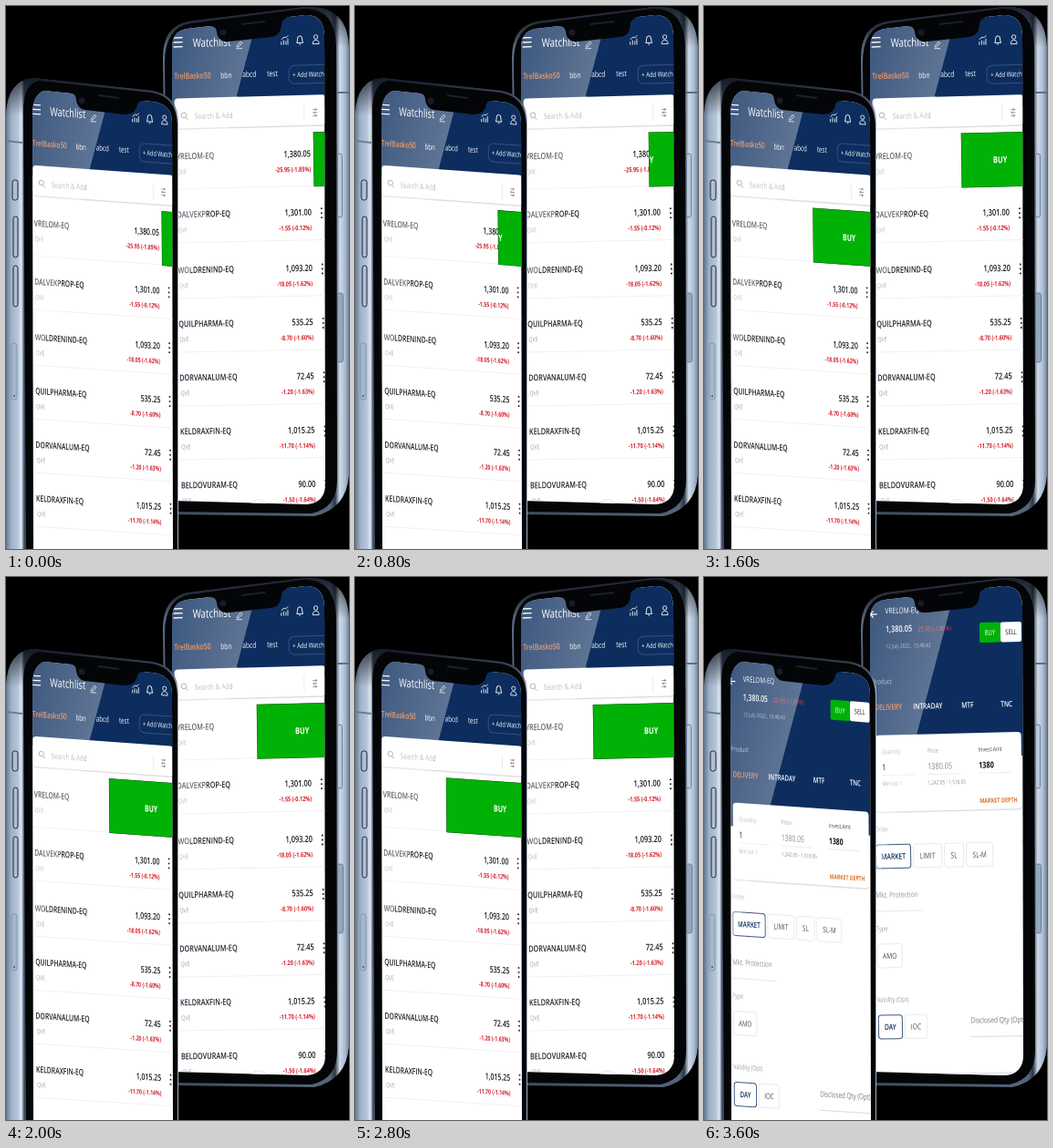
These frames come from a looping animation (376 by 596 pixels, 4000 ms). An HTML page:

```html
<!DOCTYPE html>
<html lang="en">
<head>
<meta charset="utf-8">
<title>Watchlist phones</title>
<style>
html, body { margin: 0; width: 100%; height: 100%; overflow: hidden; background: #000; }
#stage { display: block; width: 376px; height: 596px; }
text { font-family: "Open Sans", "Noto Sans", sans-serif; white-space: pre; }
</style>
</head>
<body>
<svg id="stage" viewBox="0 0 376 596" xmlns="http://www.w3.org/2000/svg"></svg>
<script>
const NAVY = '#0c2d5e', ORANGE = '#e8793a', RED = '#d3222c', GREEN = '#00b205';
const INK = '#1d2026', GREY = '#a3a6ab', BLACK = '#040507';
const STEP = 400, LOOP = 4000, ORDER_STEP = 9;
// left edge of the swipe panel at each step
const SWIPE = [151.5, 144, 136.5, 109.5, 96.5, 89.5, 82.5, 75.5, 68.5];

const ROWS = [
  [165, 'VRELOM-EQ', '1,380.05', '-25.95 (-1.85%)'],
  [229, 'DALVEKPROP-EQ', '1,301.00', '-1.55 (-0.12%)'],
  [290, 'WOLDRENIND-EQ', '1,093.20', '-18.05 (-1.62%)'],
  [349, 'QUILPHARMA-EQ', '535.25', '-8.70 (-1.60%)'],
  [408, 'DORVANALUM-EQ', '72.45', '-1.20 (-1.63%)'],
  [467, 'KELDRAXFIN-EQ', '1,015.25', '-11.70 (-1.14%)'],
  [526, 'BELDOVURAM-EQ', '90.00', '-1.50 (-1.64%)']
];

// Each phone maps screen units (u across, v down) to the stage.
const PHONES = [
  {
    id: 'back', x: 186, dy: 0, k: 1, shear: .015, slope: v => -.03 + .00003 * v,
    shell: 'M172 60Q171 22 200 17L328 1Q374-1 376 45L376 515Q373 552 338 560L180 558Z',
    bezel: 'M174 62Q174 24 202 19L327 3Q361 2 362 45L363 520Q363 551 335 557L180 555Z',
    screen: 'M182 46Q182 28 198 25L328 10Q348 9 349 32L350 525Q350 545 330 547L182 543Z',
    notch: 'M224 22Q230 22 231 28Q232 40 244 39L290 34Q301 33 302 20Q302 15 308 13L308 9L224 19Z',
    camera: [238, 29], speaker: 'M258 20L284 17',
    metal: [[0, '#5d6d83'], [.06, '#3f4c60'], [.9, '#55657c'], [.925, '#2a3546'], [.95, '#cfdbe8'], [.98, '#a8bad0'], [1, '#6d8099']],
    glare: 'M170 0H279L133 550H170Z', edge: [267, 45],
    side: bar(363.5, 162, 5, 70, '#b9c9da') + bar(363.5, 315, 6, 76, '#94a7be') + line('M363 95H376', '#5d6f86', 2)
  },
  {
    id: 'front', x: 30, dy: 73.3, k: .93, shear: .008, slope: v => .068 - .00002 * v,
    shell: 'M0 118Q2 82 30 79L160 93Q189 98 189 128L189 596L0 596Z',
    bezel: 'M19 120Q18 85 36 82L160 95Q187 100 188 130L188 596L22 596Z',
    screen: 'M29 120Q29 97 42 93L160 105Q182 107 182 128L183 596L30 596Z',
    notch: 'M72 96Q77 97 77 103Q78 112 86 114L130 119Q142 119 144 108Q145 104 150 104L150 98L72 90Z',
    camera: [83, 104], speaker: 'M101 98L124 101',
    metal: [[0, '#64768e'], [.03, '#9fb1c7'], [.07, '#b6c6d9'], [.09, '#e0e9f3'], [.105, '#3a4860'], [.97, '#66778e'], [1, '#a9b9cb']],
    glare: 'M20 80H118L-19 596H20Z', edge: [108, 118],
    side: bar(7, 191, 6, 22, '#aebfd3', '#1d2735') + bar(8, 231, 5, 45, '#aebfd3', '#1d2735') +
      bar(8, 285, 5, 45, '#aebfd3', '#1d2735') + bar(6, 370, 6, 62, '#a5b7cc', '#8396ae') +
      `<circle cx="9" cy="428" r="1" fill="#44546a"/>` + line('M0 148L18 150', '#6b7d94', 2)
  }
];

function bar(x, y, w, h, fill, stroke = '#6d8098') {
  return `<rect x="${x}" y="${y}" width="${w}" height="${h}" rx="2.5" fill="${fill}" stroke="${stroke}"/>`;
}

function line(d, color, width = 1) {
  return `<path d="${d}" fill="none" stroke="${color}" stroke-width="${width}"/>`;
}

function label(str, size, fill, weight = 400, anchor = 'start', x = 0, y = 0) {
  return `<text transform="translate(${x} ${y}) scale(.76 1)" y="${size * .36}" font-size="${size}" ` +
    `fill="${fill}" font-weight="${weight}" text-anchor="${anchor}">${str.replace(/&/g, '&amp;')}</text>`;
}

function tools(p) {
  const at = (u, v, inner) => {
    const s = p.slope(v);
    const x = p.x + p.k * u + p.shear * (v - 200), y = v + p.dy + s * u;
    return `<g transform="matrix(${p.k} ${s} ${p.shear} 1 ${x} ${y})">${inner}</g>`;
  };
  const icon = (u, v, inner) => at(u, v, `<g transform="scale(.85)">${inner}</g>`);
  const text = (u, v, ...args) => at(u, v, label(...args));
  const box = (u, v, w, h, fill, stroke = 'none', r = 0) => at(u, v,
    `<rect width="${w}" height="${h}" rx="${r}" fill="${fill}" stroke="${stroke}"/>`);
  const rule = (u, v, w, color = '#e6e8ea') => at(u, v, line(`M0 0H${w}`, color));
  const header = v => at(-12, v, `<rect y="-220" width="190" height="220" fill="${NAVY}"/>`);
  const card = (u, v, w, h) => box(u, v + 1.5, w, h, 'rgba(0,0,0,.13)', 'none', 4) + box(u, v, w, h, '#fff', 'none', 4);
  return { at, icon, text, box, rule, header, card };
}

function listScreen(p) {
  const { at, icon, text, box, rule, header, card } = tools(p);
  let out = header(112);
  out += at(0, 40, line('M0-5H10M0 0H10M0 5H10', '#fff', 1.3));
  out += text(21, 41, 'Watchlist', 13, '#fff');
  out += icon(72, 44.5, line('M-3 2L2-4L4-2L-1 3L-3 3ZM-4 5H4', '#fff', .9));
  out += icon(121.5, 41, line('M-4 6V2M-1 6V0M2 6V1M4.500 6V-2M-4-1L0-4L2-3L5-6', '#fff'));
  out += icon(138.5, 41, line('M-4 4Q-3 2-3-1Q-3-5 0-5Q3-5 3-1Q3 2 4 4ZM-1 6H1', '#fff', 1.1));
  out += icon(156, 41, `<circle cy="-3" r="2.600" fill="none" stroke="#fff"/>` + line('M-4 6Q-4 1 0 1Q4 1 4 6Z', '#fff'));

  out += text(0, 77, 'TrelBasko50', 9.2, ORANGE, 600);
  out += text(51, 77.5, 'bbn', 8.8, '#fff') + text(75, 77, 'abcd', 8.8, '#fff') + text(102, 77, 'test', 8.8, '#fff');
  out += box(126, 69, 60, 20, 'none', '#36527c', 6) + text(130, 79, '+ Add Watch', 7.8, '#fff');

  out += card(0, 101.5, 166, 33);
  out += icon(11, 121, `<circle cx="-1" cy="-1" r="3.300" fill="none" stroke="#888"/>` + line('M1.500 2L4 5', '#888'));
  out += text(22, 121.5, 'Search & Add', 8.8, '#a2a4a8');
  out += at(142, 121, line('M0-9V9', '#ececec'));
  out += icon(154, 121, line('M-3-4H3M-3 0H3M-3 4H3', '#888') + line('M1-5.500V-2.500M-1-1.500V1.500M1 2.500V5.500', '#888', 1.2));

  ROWS.forEach(([v, name, price, change], i) => {
    out += text(1, v, name, 9.6, INK, 600);
    out += text(2, v + 17, 'QVE', 7, '#a0a0a0');
    out += text(148.5, v + .5, price, 9.8, '#15171b', 600, 'end');
    out += text(148.5, v + 17.5, change, 7.3, RED, 700, 'end');
    out += at(159.5, v + 2, [-5, 0, 5].map(y => `<circle cy="${y}" r="1" fill="#222"/>`).join(''));
    out += rule(0, v + (i ? 31 : 36), 166, '#f0f0f2');
  });
  out += at(86, 553, '<circle r="10" fill="#fff" stroke="#e8e8e8"/>');
  out += at(0, 172, `<svg class="swipe" y="-30" height="60" overflow="hidden">
    <rect width="170" height="60" fill="${GREEN}" stroke="#084a0a"/>
    <g class="buy">${label('BUY', 9.8, '#fff', 700, 'middle', 0, 30)}</g></svg>`);
  return out;
}

function orderScreen(p) {
  const { at, text, box, rule, header, card } = tools(p);
  const button = (u, v, w, str, on) =>
    box(u, v - 13, w, 26, '#fff', on ? '#40587d' : '#e9ebee', 3) +
    text(u + w / 2, v, str, 8.8, on ? NAVY : '#4c5057', on ? 600 : 400, 'middle');
  const field = (u, v, head, value, note, ink, weight, headInk = GREY) =>
    text(u, v, head, 6.8, headInk) +
    text(u, v + 17, value, 9.6, ink, weight) + rule(u, v + 26, 36, '#ececee') +
    text(u, v + 35, note, 6.3, '#8b8e93');

  let out = header(200);
  out += at(-2, 41, line('M8 0H1M4-3.500L.500 0L4 3.500', '#fff', 1.2));
  out += text(15, 37.5, 'VRELOM-EQ', 8.7, '#fff');
  out += text(15, 57.5, '1,380.05', 9.7, '#fff', 600);
  out += text(49, 58.5, '-25.95 (-1.85%)', 7.3, '#dd3d42');
  out += text(15, 76.5, '12 July 2022 , 15:48:43', 6.3, '#a9b4c5');
  out += box(118, 53.5, 23, 22, GREEN, 'none', 2) + box(141, 53.5, 23, 22, '#fff', 'none', 2);
  out += text(129.5, 64.5, 'BUY', 7.8, '#fff', 500, 'middle') + text(152.5, 64.5, 'SELL', 7.8, '#222', 500, 'middle');
  out += text(0, 115, 'Product', 7.6, '#a9b7ca');
  ['DELIVERY', 'INTRADAY', 'MTF', 'TNC'].forEach((str, i) => {
    out += text([2, 44, 97, 140][i], 143, str, 8.7, i ? '#fff' : ORANGE, 600);
  });

  out += card(2, 174, 160, 84);
  out += field(9, 192, 'Quantity', '1', 'Min Lot: 1', '#222', 600);
  out += field(59, 192, 'Price', '1380.05', '1,242.05 - 1,518.05', '#85888d', 400);
  out += field(115, 192, 'Invest.Amt', '1380', '', '#111', 700, '#444');
  out += text(157, 248, 'MARKET DEPTH', 7.2, '#d9732f', 700, 'end');

  out += text(0, 277, 'Order', 7.4, GREY);
  out += button(1, 307, 38, 'MARKET', true) + button(42, 307, 31, 'LIMIT') + button(76, 307, 21, 'SL') + button(100, 307, 29, 'SL-M');
  out += text(0, 349, 'Mkt. Protection', 8.6, '#8f9297') + rule(0, 367, 51);
  out += text(0, 386, 'Type', 7.6, GREY) + button(1, 416, 27, 'AMO');
  out += text(0, 464, 'Validity (Opt)', 7.6, '#9a9da2');
  out += button(1, 494, 26, 'DAY', true) + button(30, 494, 24, 'IOC');
  out += text(102, 488, 'Disclosed Qty (Opt)', 8.8, '#74777c') + rule(102, 506, 64, '#d9dbde');
  out += box(-4, 545, 180, 30, '#ececee');
  return out;
}

function phone(p) {
  const [ex, ey] = p.edge, [cx, cy] = p.camera;
  const stops = p.metal.map(([o, c]) => `<stop offset="${o}" stop-color="${c}"/>`).join('');
  return `<defs>
    <linearGradient id="${p.id}-metal">${stops}</linearGradient>
    <linearGradient id="${p.id}-shade" x2="0" y2="1">
      <stop offset="0" stop-color="#080c14" stop-opacity=".75"/><stop offset=".08" stop-color="#080c14" stop-opacity="0"/>
    </linearGradient>
    <linearGradient id="${p.id}-glare" gradientUnits="userSpaceOnUse" x1="${ex - 85}" y1="${ey - 22}" x2="${ex}" y2="${ey}">
      <stop offset="0" stop-color="#fff" stop-opacity=".2"/><stop offset="1" stop-color="#fff" stop-opacity=".34"/>
    </linearGradient>
    <clipPath id="${p.id}-clip"><path d="${p.screen}"/></clipPath></defs>
    <path d="${p.shell}" fill="url(#${p.id}-metal)"/>
    <path d="${p.shell}" fill="url(#${p.id}-shade)"/>${p.side}
    <path d="${p.bezel}" fill="${BLACK}"/>
    <g clip-path="url(#${p.id}-clip)">
      <rect width="376" height="596" fill="#fff"/>
      <g class="list">${listScreen(p)}</g>
      <g class="order">${orderScreen(p)}</g>
      <path d="${p.glare}" fill="url(#${p.id}-glare)"/>
    </g>
    <path d="${p.notch}" fill="${BLACK}"/>
    <circle cx="${cx}" cy="${cy}" r="3.5" fill="#171b25"/>${line(p.speaker, '#1c2029', 2)}`;
}

const stage = document.getElementById('stage');
stage.innerHTML = PHONES.map(phone).join('');
const each = (cls, fn) => stage.querySelectorAll(cls).forEach(fn);

function show(step) {
  const order = step === ORDER_STEP;
  each('.list', g => g.style.display = order ? 'none' : '');
  each('.order', g => g.style.display = order ? '' : 'none');
  if (order) return;
  const u = SWIPE[step];
  const center = step < 3 ? 134 : 139;
  each('.swipe', s => {
    s.setAttribute('x', u);
    s.setAttribute('width', 170 - u);
  });
  each('.buy', g => {
    g.setAttribute('transform', `translate(${center - u} 0)`);
    g.style.display = step < 2 ? 'none' : '';
  });
}

const start = performance.now();
let last = -1;
function tick() {
  const step = Math.floor((performance.now() - start) % LOOP / STEP);
  if (step !== last) show(last = step);
  requestAnimationFrame(tick);
}
tick();
</script>
</body>
</html>
```
